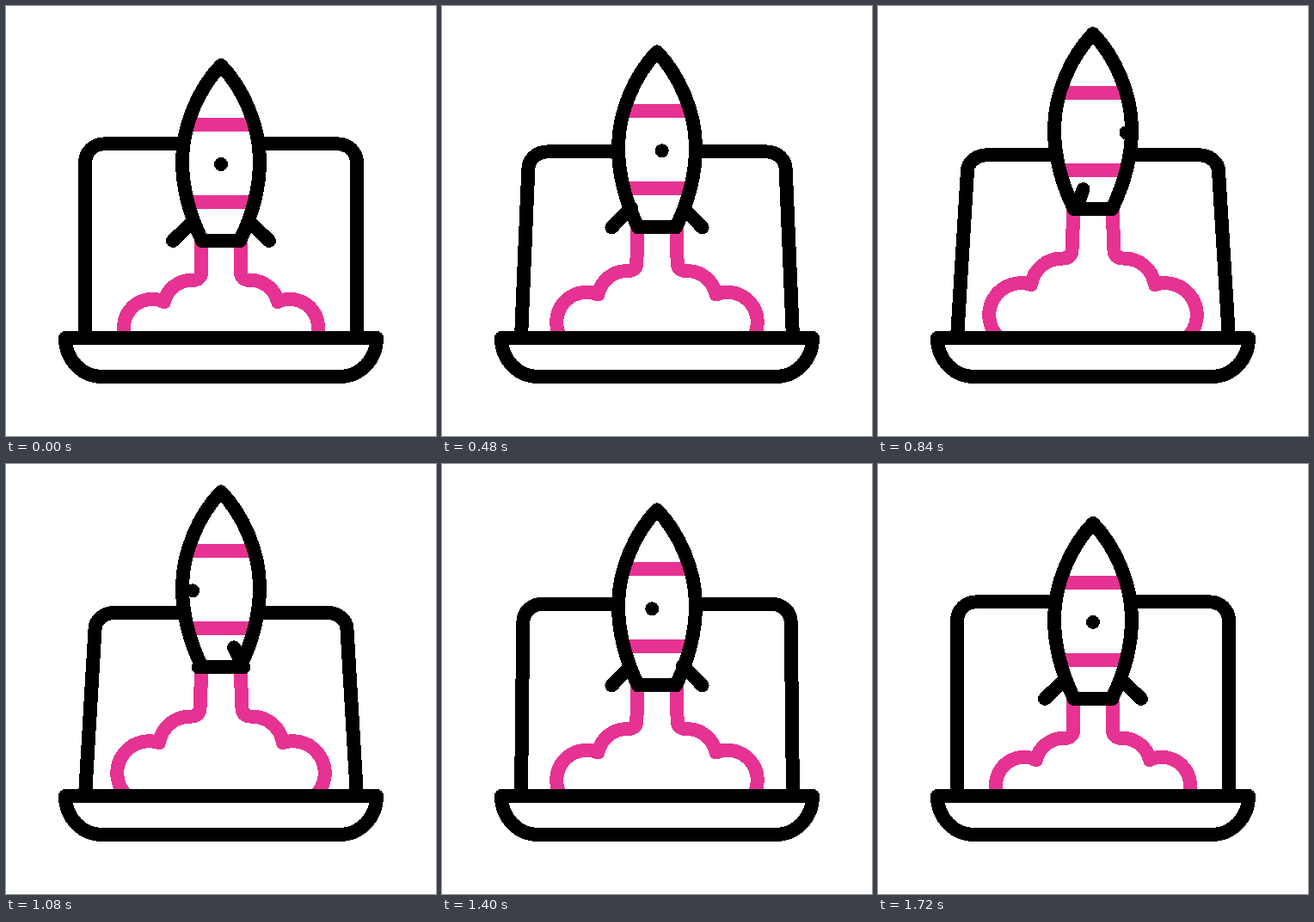
An HTML page for the animation above (2000 ms loop, 500 by 500 pixels).

```html
<!DOCTYPE html>
<html lang="en">
<head>
<meta charset="utf-8">
<title>Rocket launch</title>
<style>
  html, body { margin: 0; height: 100%; overflow: hidden; background: #fff; }
  svg { display: block; width: 100vw; height: 100vh; shape-rendering: crispEdges; }
  .line { fill: none; stroke: #000; stroke-width: 16; stroke-linecap: round; stroke-linejoin: round; }
  .pink { stroke: #e63293; }
  .white { fill: #fff; }
</style>
</head>
<body>
<svg viewBox="0 0 500 500">
  <defs>
    <path id="hull" d="M250 69C225 95 205 138 205 180C205 214 214 244 228 273H272C286 244 295 214 295 180C295 138 275 95 250 69Z"/>
    <clipPath id="inside"><use href="#hull"/></clipPath>
  </defs>
  <path id="screen" class="line"/>
  <path id="smoke" class="line pink"/>
  <use href="#smoke" transform="matrix(-1 0 0 1 500 0)"/>
  <path class="line white" d="M69 386H431C431 410 413 431 388 431H112C87 431 69 410 69 386Z"/>
  <g id="rocket">
    <path id="backFin" class="line"/>
    <use href="#hull" class="white"/>
    <g clip-path="url(#inside)">
      <path class="line pink" d="M200 138H300M200 228H300"/>
      <circle id="porthole" cy="184" r="8"/>
    </g>
    <use href="#hull" class="line"/>
    <path id="frontFin" class="line"/>
  </g>
</svg>
<script>
const LOOP = 2000, STEP = 40;
const TURN = 940;         // the rocket is half turned here
const TILT = 860;         // the screen leans furthest here
const el = id => document.getElementById(id);
const clamp = x => Math.min(1, Math.max(0, x));
const easeInOut = x => x < .5 ? 4 * x ** 3 : 1 - 4 * (1 - x) ** 3;
const mix = (a, b, k) => a + (b - a) * k;

function drawScreen(lean) {
  const x = 92 + lean * .92, top = 160.3 + lean, side = 183 + lean * .7;
  el('screen').setAttribute('d',
    `M92 386L${x} ${side}C${x} ${top + 9} ${x + 10} ${top} ${x + 23} ${top}` +
    `H${477 - x}C${490 - x} ${top} ${500 - x} ${top + 9} ${500 - x} ${side}L408 386`);
}

function drawSmoke(k) {
  const bend = mix(309, 283.5, k);
  const small = mix(32, 36.2, k), big = mix(33, 37.2, k);
  const cx = mix(170, 164.5, k), cy = mix(374, 357.6, k);
  const endX = cx - Math.sqrt(big ** 2 - (386 - cy) ** 2);
  el('smoke').setAttribute('d',
    `M227.5 ${273 - 37 * k}L${227 - 1.5 * k} ${bend}q0 10 -11 10` +
    `A${small} ${small} 0 0 0 ${mix(184, 178, k)} ${mix(344, 324, k)}` +
    `A${big} ${big} 0 0 0 ${endX} 386`);
}

function drawFin(id, spread) {
  el(id).setAttribute('d', `M${250 + 32 * spread} 250L${250 + 56 * spread} 273`);
}

function render(t) {
  const away = Math.abs(t - TURN), side = t < TURN ? -1 : 1;
  const rise = easeInOut(clamp((820 - away) / 760));
  const turn = clamp(1 - away / 820);
  const spread = side * (1 - turn ** 3.4);

  drawScreen(13 * easeInOut(clamp((807 - Math.abs(t - TILT)) / 740)));
  drawSmoke(rise);
  el('rocket').setAttribute('transform', `translate(0 ${-36.8 * rise})`);
  el('porthole').setAttribute('cx', 250 - side * 55 * turn ** 2.75);
  drawFin('frontFin', spread);
  drawFin('backFin', -spread);
}

const start = performance.now();
function tick() {
  const t = (performance.now() - start) % LOOP;
  render(Math.floor(t / STEP) * STEP);
  requestAnimationFrame(tick);
}
tick();
</script>
</body>
</html>
```
